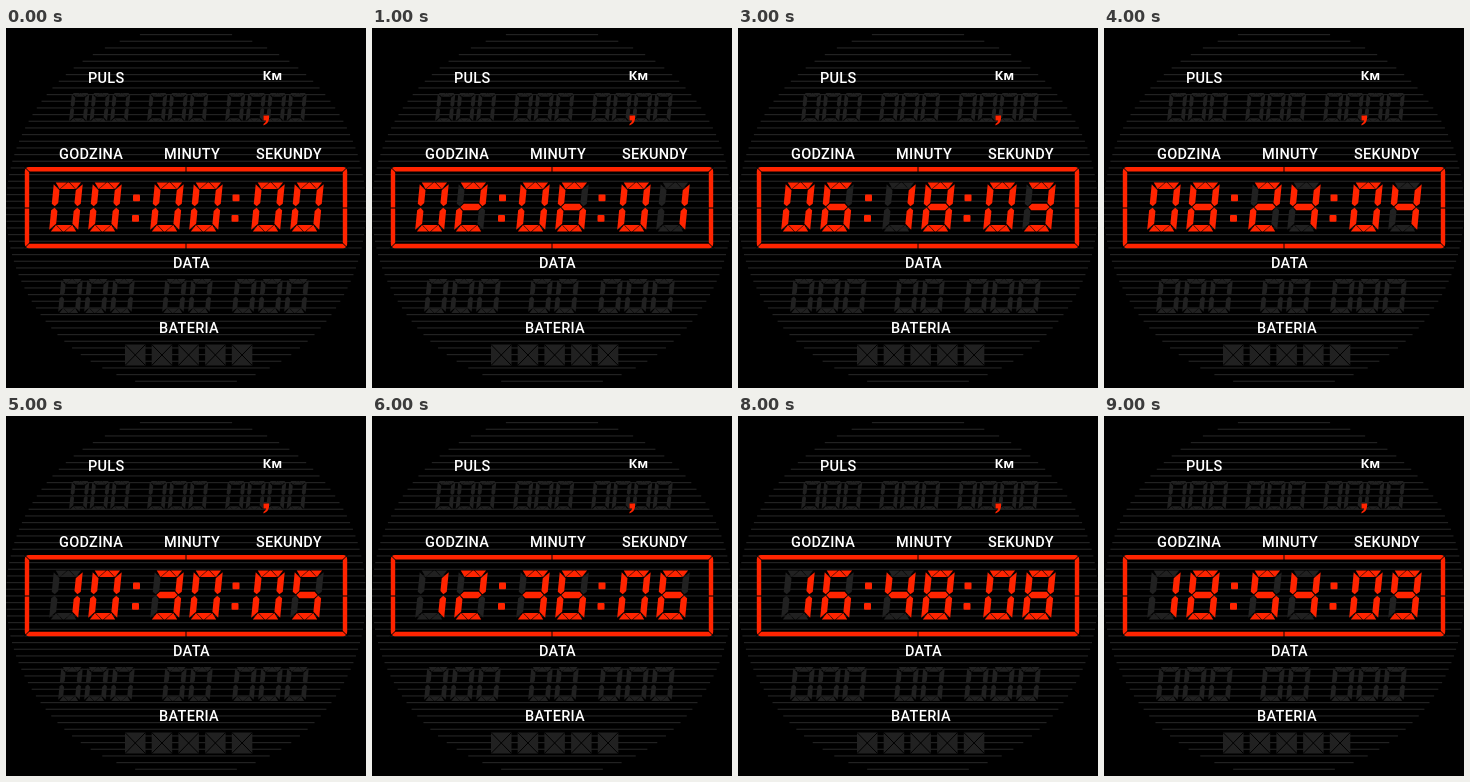
Write an HTML page that moves like this. It is 360 px wide and 360 px high and loops after 10 s.

```html
<!DOCTYPE html>
<html lang="pl">
<head>
<meta charset="utf-8">
<style>
html, body { margin: 0; width: 100%; height: 100%; overflow: hidden; background: #000; }
svg { display: block; width: 360px; height: 360px; }
text { fill: #fff; font: 500 14.5px Roboto, Inter, sans-serif; letter-spacing: .3px; }
.km { font: 700 13px "Open Sans", "Noto Sans", sans-serif; letter-spacing: 0; }
.dim { fill: #212121; }
.lit { fill: #ff2400; }
.line { fill: #222; }
.frame { fill: none; stroke: #ff2400; stroke-width: 4.4; }
.cut { fill: none; stroke: #000; }
</style>
</head>
<body>
<svg id="stage" viewBox="0 0 360 360"></svg>
<script>
const stage = document.getElementById('stage');
const CENTER = 180;
const SLANT = 0.1;
const GLYPHS = ['abcdef', 'bc', 'abdeg', 'abcdg', 'bcfg', 'acdfg', 'acdefg', 'abc', 'abcdefg', 'abcdfg'];

function add(tag, attrs, parent = stage) {
  const node = document.createElementNS('http://www.w3.org/2000/svg', tag);
  for (const key in attrs) node.setAttribute(key, attrs[key]);
  parent.append(node);
  return node;
}

// Mitred segments: bars are split into three wedges, uprights meet in points.
function segmentPaths(w, h) {
  const t = w * 0.22, gap = w * 0.025, mid = h / 2;
  const path = points => 'M' + points.map(p => p.join()).join('L') + 'Z';
  const bar = flip => {
    const outer = flip ? h : 0, inner = flip ? h - t : t;
    const side = mirror => {
      const x = v => mirror ? w - v : v;
      return path([[x(2.5 * gap), outer], [x(w / 2 - 2 * gap), outer], [x(t), inner]]);
    };
    return side(false) + side(true) +
      path([[w / 2 - gap, outer], [w / 2 + gap, outer], [w - t - gap, inner], [t + gap, inner]]);
  };
  const upright = (right, low) => path([
    [0, 2.5 * gap], [t, t + 2 * gap], [t, mid - t / 2 - gap], [t / 2, mid - gap], [0, mid - t / 2]
  ].map(([x, y]) => [right ? w - x : x, low ? h - y : y]));
  const middle = path([
    [t / 2 + gap, mid], [t + gap, mid - t / 2], [w - t - gap, mid - t / 2],
    [w - t / 2 - gap, mid], [w - t - gap, mid + t / 2], [t + gap, mid + t / 2]
  ]);
  return {
    a: bar(false), b: upright(true, false), c: upright(true, true), d: bar(true),
    e: upright(false, true), f: upright(false, false), g: middle
  };
}

function digit(x, y, w, h) {
  const cell = add('g', { transform: `matrix(1 0 ${-SLANT} 1 ${x + SLANT * h} ${y})` });
  return Object.entries(segmentPaths(w, h)).map(([name, d]) => ({ name, node: add('path', { d }, cell) }));
}

// Unlit digits keep a faint zero.
function show(segments, glyph) {
  for (const { name, node } of segments) {
    const on = glyph.includes(name);
    node.setAttribute('class', on ? 'lit' : 'dim');
    node.setAttribute('visibility', on || name !== 'g' ? 'visible' : 'hidden');
  }
}

function digitGroup(x, y, w, h, count, pitch) {
  return Array.from({ length: count }, (_, i) => {
    const segments = digit(x + i * pitch, y, w, h);
    show(segments, '');
    return segments;
  });
}

function drawFace() {
  for (let y = 6; y < 355; y += 20 / 3) {
    const half = Math.sqrt(CENTER ** 2 - (y - CENTER) ** 2);
    add('rect', { x: CENTER - half, y, width: 2 * half, height: 1.2, class: 'line' });
  }
}

function drawIdleRows() {
  for (let group = 0; group < 3; group++) {
    digitGroup(63 + 78 * group, 65, 17.5, 29, group < 2 ? 3 : 4, 20.5);
    const short = group === 1;
    digitGroup(52 + 87 * group + (short ? 17 : 0), 251, 21.5, 34, short ? 2 : 3, 26);
  }
  for (let i = 0; i < 5; i++) {
    const x = 119 + i * 26.7;
    add('rect', { x, y: 316.5, width: 20.5, height: 21, class: 'dim' });
    add('path', { d: `M${x} 316.5l20.5 21m0-21l-20.5 21`, class: 'cut' });
  }
}

function drawFrame() {
  add('rect', { x: 21, y: 141.2, width: 318, height: 76.8, rx: 2, class: 'frame' });
  for (const sx of [-1, 1]) {
    for (const sy of [-1, 1]) {
      add('path', { d: `M${CENTER + sx * 156} ${179.5 + sy * 35}l${sx * 6} ${sy * 6}`, class: 'cut' });
    }
  }
  add('path', { d: 'M180 138v6m0 71v6M18 180h6m312 0h6', class: 'cut' });
}

function drawMarks() {
  for (const x of [127, 226.5]) {
    for (const row of [0, 1]) {
      add('rect', { x: x - row, y: 166.5 + row * 20.5, width: 7, height: 6.8, rx: 1, class: 'lit' });
    }
  }
  add('path', { d: 'M257.5 87.5h5.5v3.5q-.5 4.5-5.5 6.5v-1.6q2.6-1.5 2.7-3.4h-2.7z', class: 'lit' });
}

function label(content, x, y, className = '') {
  add('text', { x, y, class: className }).textContent = content;
}

drawFace();
drawIdleRows();
drawFrame();
const clock = [0, 1, 2].flatMap(pair => digitGroup(43 + 101 * pair, 154.5, 29, 49, 2, 39));
drawMarks();

label('PULS', 82, 55);
label('Км', 256.5, 52, 'km');
label('GODZINA', 53, 131);
label('MINUTY', 158, 131);
label('SEKUNDY', 250, 131);
label('DATA', 167, 240);
label('BATERIA', 153, 305);

function tick() {
  const step = Math.floor(performance.now() / 1000) % 10;
  const digits = [step * 2, step * 6, step].map(n => String(n).padStart(2, '0')).join('');
  clock.forEach((segments, i) => show(segments, GLYPHS[digits[i]]));
  requestAnimationFrame(tick);
}
tick();
</script>
</body>
</html>
```
